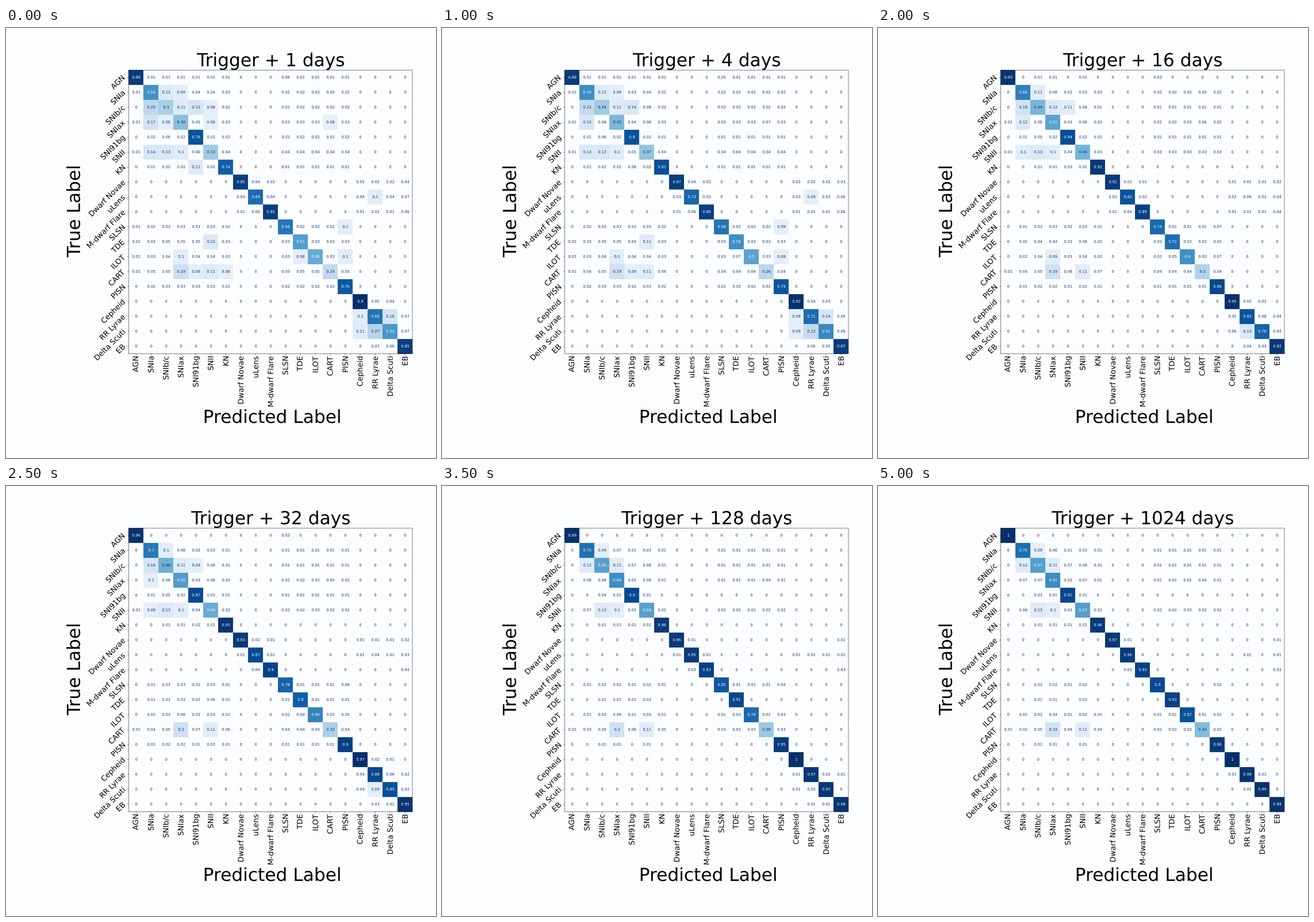
These frames come from a looping animation (748x748 px, 5.5 s). A matplotlib script:

```python
import numpy as np
import matplotlib.pyplot as plt
from matplotlib.animation import FuncAnimation
from matplotlib.collections import LineCollection, PathCollection
from matplotlib.colors import to_rgba
from matplotlib.patches import PathPatch, Rectangle
from matplotlib.path import Path
from matplotlib.textpath import TextPath
from matplotlib.transforms import Affine2D

SIZE, DPI = 748, 100
STEPS, STEP_MS = 11, 500
PX = 72 / DPI                                 # one pixel in points
BG = "#fcfdff"
SMALL, MEDIUM, LARGE = 6.49, 12.98, 31.25     # font sizes in pixels

# Start and end of each class's hit rate, in percent.
HITS = {"AGN": (86, 100), "SNIa": (56, 76), "SNIb/c": (30, 57),
        "SNIax": (38, 65), "SNI91bg": (78, 91), "SNII": (33, 57),
        "KN": (74, 96), "Dwarf Novae": (85, 97), "uLens": (69, 96),
        "M-dwarf Flare": (85, 93), "SLSN": (66, 90), "TDE": (51, 93),
        "ILOT": (46, 87), "CART": (24, 46), "PISN": (76, 96),
        "Cepheid": (90, 100), "RR Lyrae": (66, 98), "Delta Scuti": (54, 99),
        "EB": (85, 99)}
# Strongest confusions at the start; the rest of a row leaks evenly.
CONFUSED = {"AGN": {"SLSN": 6},
            "SNIa": {"SNIb/c": 12, "SNIax": 9},
            "SNIb/c": {"SNIa": 25, "SNIax": 11, "SNI91bg": 15, "SNII": 8},
            "SNIax": {"SNIa": 17, "SNIb/c": 8, "SNII": 8, "CART": 8},
            "SNI91bg": {"SNIb/c": 6},
            "SNII": {"SNIa": 14, "SNIb/c": 13, "SNIax": 10},
            "KN": {"SNI91bg": 11},
            "Dwarf Novae": {"uLens": 4},
            "uLens": {"RR Lyrae": 10},
            "M-dwarf Flare": {"uLens": 6, "EB": 6},
            "SLSN": {"PISN": 10},
            "TDE": {"SNII": 12},
            "ILOT": {"SNIax": 10, "TDE": 8, "PISN": 10},
            "CART": {"SNIax": 19, "SNI91bg": 9, "SNII": 11, "KN": 8,
                     "SNIb/c": 5},
            "Cepheid": {"RR Lyrae": 5, "Delta Scuti": 4},
            "RR Lyrae": {"Cepheid": 10, "Delta Scuti": 16, "EB": 7},
            "Delta Scuti": {"Cepheid": 11, "RR Lyrae": 27, "EB": 7},
            "EB": {"RR Lyrae": 7, "Delta Scuti": 6}}
SETTLE = {"KN": 5.5, "SLSN": 10, "ILOT": 10, "CART": 12}   # others: 8 steps
LABELS = list(HITS)
N = len(LABELS)
STELLAR = {"Dwarf Novae", "uLens", "M-dwarf Flare", "Cepheid", "RR Lyrae",
           "Delta Scuti", "EB"}
LOOKALIKE = {"SNIb/c", "SNIax", "SNII"}

CELL = 0.66 * SIZE / N
SIDE = N * CELL
LEFT, TOP = 213.3, 73.15
RIGHT, BOTTOM = LEFT + SIDE, TOP + SIDE
MID_X, MID_Y = LEFT + SIDE / 2, TOP + SIDE / 2


def pull(label):
    """How much of the leaked rest a class attracts."""
    if label in LOOKALIKE or label == "SNI91bg":
        return 3
    return {"AGN": 0.5, "EB": 4}.get(label, 2)


def smooth(t):
    t = min(max(t, 0), 1)
    return t * t * (3 - 2 * t)


def misses(label):
    """Starting share of every wrong class; leaks stay in the family."""
    strong = CONFUSED.get(label, {})
    leak = np.array([pull(c) if c != label and c not in strong
                     and (c in STELLAR) == (label in STELLAR) else 0
                     for c in LABELS], float)
    rest = 100 - HITS[label][0] - sum(strong.values())
    return (rest * leak / leak.sum()
            + np.array([strong.get(c, 0) for c in LABELS]))


MISSES = {c: misses(c) for c in LABELS}
# Similar supernovae keep drawing a growing part of the misses.
GROWTH = np.array([1.7 if c in LOOKALIKE else 0.8 for c in LABELS])


def matrix(k):
    m = np.zeros((N, N))
    for i, label in enumerate(LABELS):
        p = smooth(k / SETTLE.get(label, 8))
        start, end = HITS[label]
        hit = start + (end - start) * p
        w = MISSES[label] * GROWTH ** p
        m[i] = w / w.sum() * (100 - hit)
        m[i, i] = hit
    return np.rint(m) / 100


def glyphs(s, x, y, size, rot=0, align=0.5):
    """Outline of s on a baseline through (x, y), y pointing down."""
    path = TextPath((0, 0), s, size=size)
    box = path.get_extents()
    move = Affine2D().translate(-box.x0 - align * box.width, 0)
    # The side bearing always shifts text to the right, even when rotated.
    move.scale(1, -1).rotate_deg(-rot).translate(x + box.x0, y)
    return move.transform_path(path)


def title_path(k):
    return glyphs(f"Trigger + {2 ** k} days", MID_X, 66.5, LARGE)


fig = plt.figure(figsize=(SIZE / DPI, SIZE / DPI), dpi=DPI, facecolor=BG)
ax = fig.add_axes([0, 0, 1, 1])
ax.axis("off")

blues = plt.get_cmap("Blues")
dark, light = blues(1.0), blues(0.0)
FINE = np.ones((24, 24, 1))     # upsampling keeps cell edges at subpixels
heat = ax.imshow(np.kron(np.ones((N, N, 4)), FINE), interpolation="bilinear",
                 extent=(LEFT, RIGHT, BOTTOM, TOP), aspect="auto")
ax.set(xlim=(0, SIZE), ylim=(SIZE, 0))

ax.add_patch(Rectangle((LEFT, TOP), SIDE, SIDE, fill=False, ec="black",
                       lw=0.5 * PX, snap=False, zorder=3))
ticks = []
labels = [glyphs("Predicted Label", MID_X, 687, LARGE),
          glyphs("True Label", 128.8, MID_Y, LARGE, rot=90)]
for i, name in enumerate(LABELS):
    cx, cy = LEFT + (i + 0.5) * CELL, TOP + (i + 0.5) * CELL
    ticks += [[(cx, BOTTOM), (cx, BOTTOM + 2.3)], [(LEFT - 2.3, cy), (LEFT, cy)]]
    labels += [glyphs(name, cx + 3.5, BOTTOM + 4.6, MEDIUM, rot=90, align=1),
               glyphs(name, LEFT - 6.7, cy + 2.1, MEDIUM, rot=45, align=1)]
ax.add_collection(LineCollection(ticks, colors="black", linewidths=0.5 * PX,
                                 snap=False))
ax.add_collection(PathCollection(labels, facecolors="black", linewidths=0))

title = ax.add_patch(PathPatch(title_path(0), fc="black", lw=0))
numbers = ax.add_collection(PathCollection([], linewidths=0, zorder=2))
shapes = {}


def number(value, i, j):
    s = f"{value:.2g}"
    if s not in shapes:
        shapes[s] = glyphs(s, 0, 0, SMALL)
    base = shapes[s]
    x, y = LEFT + (j + 0.5) * CELL, TOP + (i + 0.5) * CELL + 1.8
    return Path(base.vertices + (x, y), base.codes)


def draw(k):
    m = matrix(k)
    share = m / m.max()
    rgba = blues(share)
    rgba[share < 0.0875] = to_rgba(BG)
    heat.set_data(np.kron(rgba, FINE))
    numbers.set_paths([number(v, i, j) for (i, j), v in np.ndenumerate(m)])
    numbers.set_facecolor([light if s > 0.5 else dark for s in share.flat])
    title.set_path(title_path(k))
    return heat, numbers, title


anim = FuncAnimation(fig, draw, frames=STEPS, interval=STEP_MS,
                     repeat=True, repeat_delay=0, blit=False)
plt.show()
```
